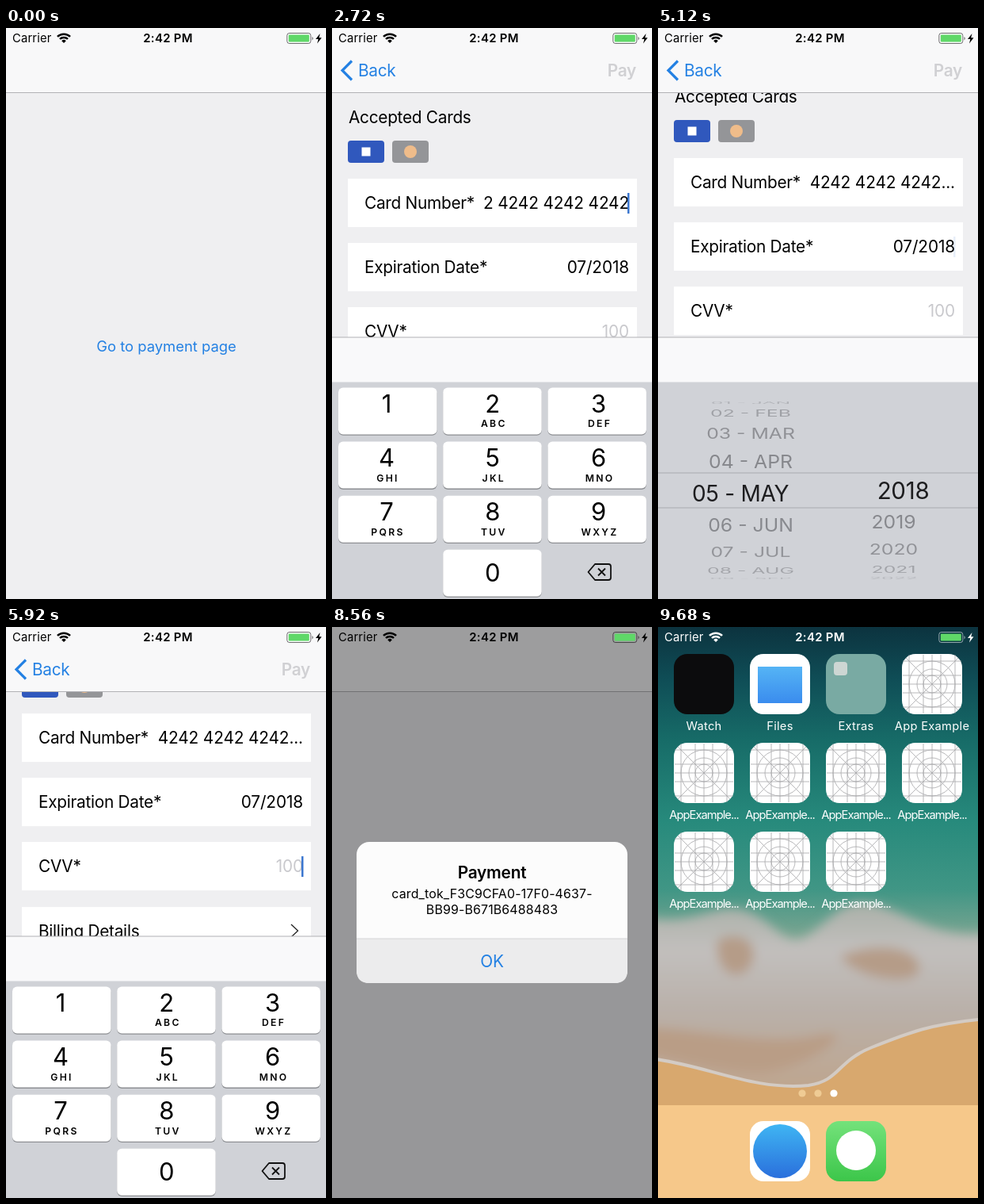
Animation of 404 by 720 pixels, one loop 9.76 s. Source, as an HTML page:

```html
<!DOCTYPE html>
<html lang="en">
<head>
<meta charset="utf-8">
<title>Card payment</title>
<style>
  html, body { margin: 0; width: 100%; height: 100%; overflow: hidden; background: #efeff1; }
  svg { display: block; font-family: Inter, "Liberation Sans", sans-serif; }
  text { white-space: pre; }
</style>
</head>
<body>
<script>
const W = 404, H = 720, LOOP = 9760, STEP = 80;
const BLUE = '#2481e3', PAGE = '#efeff1', BAR = '#f8f8f9', LINE = '#b2b2b6', KEYS = '#d0d2d7', HINT = '#c9c9cd';

// ---------- drawing helpers ----------
function add(parent, tag, attrs = {}, content) {
  const node = document.createElementNS('http://www.w3.org/2000/svg', tag);
  set(node, attrs);
  if (content !== undefined) node.textContent = content;
  return parent.appendChild(node);
}
function set(node, attrs) {
  for (const key in attrs) node.setAttribute(key, attrs[key]);
}
const group = (parent, attrs) => add(parent, 'g', attrs);
const rect = (parent, x, y, width, height, fill, attrs) =>
  add(parent, 'rect', { x, y, width, height, fill, ...attrs });
const path = (parent, d, attrs) => add(parent, 'path', { d, fill: 'none', ...attrs });
const circle = (parent, cx, cy, r, attrs) => add(parent, 'circle', { cx, cy, r, ...attrs });
// y is the middle of the capitals
const label = (parent, str, x, y, size, attrs) =>
  add(parent, 'text', { x, y: y + size * 0.364, 'font-size': size, ...attrs }, str);
const body = (parent, str, x, y, attrs) =>
  label(parent, str, x, y, 20.8, { 'letter-spacing': '-.013em', ...attrs });
const MID = { 'text-anchor': 'middle' }, END = { 'text-anchor': 'end' };

const svg = add(document.body, 'svg', { width: W, height: H, viewBox: `0 0 ${W} ${H}` });
const defs = add(svg, 'defs');

function gradient(id, stops, across) {
  const g = add(defs, 'linearGradient', { id, x1: 0, y1: 0, x2: across ? 1 : 0, y2: across ? 0 : 1 });
  for (const [offset, color, alpha = 1] of stops)
    add(g, 'stop', { offset, 'stop-color': color, 'stop-opacity': alpha });
  return `url(#${id})`;
}
function clip(id, x, y, w, h) {
  rect(add(defs, 'clipPath', { id }), x, y, w, h);
  return { 'clip-path': `url(#${id})` };
}

// ---------- launcher screen ----------
const launcher = group(svg);
rect(launcher, 0, 0, W, H, gradient('sea', [
  [0, '#0c333f'], [.09, '#0f4d56'], [.2, '#176c68'], [.34, '#278a7c'], [.46, '#409685'], [.55, '#80a692']]));
const soft = add(defs, 'filter', { id: 'soft', x: '-10%', y: '-10%', width: '120%', height: '120%' });
add(soft, 'feGaussianBlur', { stdDeviation: 7 });
const surf = group(launcher, { filter: 'url(#soft)' });
path(surf, 'M-30 362C40 385 70 345 110 358S160 412 195 385S240 335 290 355S360 395 434 385V620H-30Z',
  { fill: gradient('foam', [[0, '#aab0a8'], [.22, '#c2bfbd'], [.5, '#b9b0a9'], [1, '#c0a184']]) });
path(surf, 'M75 395C105 380 130 400 118 425S70 440 75 395ZM230 415C280 395 330 405 330 430S250 445 230 415Z', { fill: '#b59c88' });
path(surf, 'M-30 505C60 505 130 530 200 515S180 565 120 562S20 545 -30 535Z', { fill: '#b99d86' });
path(launcher, 'M-10 544C60 552 120 585 190 578C230 572 225 548 270 530S345 500 414 494V730H-10Z',
  { fill: '#d8a86e', stroke: '#d3cbc4', 'stroke-width': 4 });
rect(launcher, 0, 603, W, 117, '#f6c88a');
[182, 202, 222].forEach((x, i) => circle(launcher, x, 588, 4.6, { fill: i < 2 ? '#efcb94' : '#fff' }));

const gridIcon = add(defs, 'g', { id: 'grid' });
rect(gridIcon, 0, 0, 76, 76, '#fff', { rx: 17 });
const gridLines = group(gridIcon, { stroke: '#a6a6a9', fill: 'none', 'stroke-width': .8 });
for (const r of [11, 19, 29]) circle(gridLines, 38, 38, r);
for (const p of [9, 27, 38, 49, 67]) path(gridLines, `M${p} 1V75M1 ${p}H75`);
path(gridLines, 'M5 5L71 71M71 5L5 71');

const tile = (x, y, fill) => rect(launcher, x, y, 76, 76, fill, { rx: 17 });
const column = i => 20 + 96 * i;
const caption = (str, x, y, spacing) =>
  label(launcher, str, x + 38, y + 91, 14.7, { ...MID, fill: '#fff', 'letter-spacing': spacing });
tile(column(0), 34, '#0c0c0d');
tile(column(1), 34, '#fff');
rect(launcher, 126, 50, 56, 46, gradient('folder', [[0, '#55b4f5'], [1, '#3a8cee']]));
tile(column(2), 34, '#79aaa3');
rect(launcher, 222, 44, 17, 17, '#cdd6d3', { rx: 4 });
['Watch', 'Files', 'Extras', 'App Example'].forEach((name, i) => caption(name, column(i), 34, '.02em'));
for (let i = 0; i < 8; i++) {
  const x = column(i ? (i - 1) % 4 : 3), y = i ? 146 + 112 * Math.floor((i - 1) / 4) : 34;
  add(launcher, 'use', { href: '#grid', x, y });
  if (i) caption('AppExample...', x, y, '-.065em');
}
tile(column(1), 623, '#fff');
circle(launcher, 154, 661, 34, { fill: gradient('sky', [[0, '#3fb5f3'], [1, '#2a6fdc']]) });
tile(column(2), 623, gradient('leaf', [[0, '#74e27b'], [1, '#3cc64a']]));
circle(launcher, 250, 660, 25, { fill: '#fff' });

// ---------- app: first page ----------
const app = group(svg);
const home = group(app);
rect(home, 0, 0, W, H, PAGE);
const goButton = label(home, 'Go to payment page', 202.5, 401, 18.4, { ...MID, fill: BLUE });
const shade = rect(app, 0, 0, W, H, '#00182c');

// ---------- app: payment form ----------
const form = group(app);
rect(form, -12, 0, 12, H, gradient('edge', [[0, '#000', 0], [1, '#000', .2]], true));
rect(form, 0, 0, W, H, PAGE);
const content = group(form);
body(content, 'Accepted Cards', 21, 112);
rect(content, 20, 142, 46, 28, '#3058bd', { rx: 4 });
rect(content, 37.5, 150.5, 11, 11, '#fff');
const otherCard = group(content);
rect(otherCard, 76, 142, 46, 28, '#3c3d41', { rx: 4 });
circle(otherCard, 99, 156, 8, { fill: '#f08a25' });

function field(name, y) {
  rect(content, 20, y, 365, 61, '#fff');
  body(content, name, 41, y + 30.5);
  const holder = group(content, clip('value' + y, 190, y, 190, 61));
  const value = body(holder, '', 375, y + 30.5, { ...END, 'letter-spacing': '-.006em' });
  const cursor = rect(content, 373, y + 18, 2.5, 26, '#3b76cf');
  return (str, isHint, cursorAlpha) => {
    value.textContent = str;
    set(value, { fill: isHint ? HINT : '#000' });
    set(cursor, { opacity: cursorAlpha });
  };
}
const showNumber = field('Card Number*', 190);
const showExpiry = field('Expiration Date*', 271);
const showCode = field('CVV*', 352);
field('Billing Details', 434)('', false, 0);
path(content, 'M360 456L368.500 464L360 472', { stroke: '#222', 'stroke-width': 1.3 });

// ---------- app: input panel ----------
const panel = group(app);
rect(panel, 0, 390, W, 330, KEYS);
rect(panel, 0, 390, W, 56.5, '#f9f9fa');
rect(panel, 0, 389.5, W, 1, LINE);

const keypad = group(panel);
['', 'ABC', 'DEF', 'GHI', 'JKL', 'MNO', 'PQRS', 'TUV', 'WXYZ', null, ''].forEach((letters, i) => {
  if (letters === null) return;
  const col = i % 3, zero = i === 10;
  const x = 8 + 132.2 * col, y = 453.5 + 68.1 * Math.floor(i / 3), middle = 69 + 133.8 * col;
  rect(keypad, x, y + 1.3, 124.5, 59, '#8d8f93', { rx: 6 });
  rect(keypad, x, y, 124.5, 59, '#fff', { rx: 6 });
  label(keypad, zero ? '0' : i + 1, middle, y + (zero ? 28.5 : 20.5), 31, MID);
  label(keypad, letters, middle + 1.5, y + 45.5, 12.2, { ...MID, 'font-weight': 600, 'letter-spacing': 2.3 });
});
path(keypad, 'M332 676H349Q352 676 352 679V693Q352 696 349 696H332L323.500 686ZM336 681.500L345 690.500M345 681.500L336 690.500',
  { stroke: '#111', 'stroke-width': 1.8, 'stroke-linejoin': 'round' });

const picker = group(panel);
rect(picker, 0, 447, W, 273, KEYS);
for (const y of [561, 605]) rect(picker, 0, y - .5, W, 1, '#a9abb0');
const band = clip('band', 0, 561, W, 44);

function wheel(items, x, bigX, bigSize) {
  const far = group(picker), near = group(picker, band);
  const rows = items.map(str => ({
    small: label(far, str, 0, 0, 24.8, { ...MID, fill: '#6a6b70' }),
    big: label(near, str, 0, 0, bigSize, { ...MID, fill: '#1d1d1f', 'letter-spacing': '-.01em' })
  }));
  return position => rows.forEach(({ small, big }, i) => {
    const turn = i - position, angle = turn * 0.365;
    const hidden = Math.abs(turn) < .55 || Math.abs(angle) > 1.52;
    set(small, {
      transform: `translate(${x} ${583 + 112 * Math.sin(angle)}) scale(1 ${Math.max(.01, Math.cos(angle))})`,
      opacity: hidden ? 0 : .2 + .55 * Math.cos(angle)
    });
    set(big, { transform: `translate(${bigX} ${583 + 40 * turn})` });
  });
}
const months = 'JAN FEB MAR APR MAY JUN JUL AUG SEP OCT NOV DEC'.split(' ')
  .map((name, i) => `${String(i + 1).padStart(2, '0')} - ${name}`);
const turnMonths = wheel(months, 117, 104, 28);
wheel([2018, 2019, 2020, 2021, 2022, 2023], 297.5, 309.5, 29.5)(0);

// ---------- app: navigation bar and alert ----------
const nav = group(app);
rect(nav, 0, 0, W, 82, BAR);
rect(nav, 0, 81, W, 1, LINE);
const chevron = path(nav, 'M25 41.500L13 53.500L25 65.500', { stroke: BLUE, 'stroke-width': 3.2 });
const back = body(nav, 'Back', 33, 53.5, { fill: BLUE });
const pay = body(nav, 'Pay', 384, 53.5, { ...END, 'font-weight': 600 });

const dim = rect(app, 0, 0, W, H, '#000');
const alertBox = group(app);
rect(alertBox, 31, 271, 342, 178, '#fcfcfc', { rx: 16 });
path(alertBox, 'M31 393H373V433Q373 449 357 449H47Q31 449 31 433Z', { fill: '#ececed' });
rect(alertBox, 31, 392.5, 342, 1, '#d6d6d8');
label(alertBox, 'Payment', 202, 309.5, 20.8, { ...MID, 'font-weight': 600, 'letter-spacing': '-.01em' });
label(alertBox, 'card_tok_F3C9CFA0-17F0-4637-', 202, 336.5, 15.9, { ...MID, 'letter-spacing': '.01em' });
label(alertBox, 'BB99-B671B6488483', 202, 356.5, 15.9, { ...MID, 'letter-spacing': '.01em' });
body(alertBox, 'OK', 202, 421.5, { ...MID, fill: BLUE });

// ---------- status bar ----------
const status = group(svg);
label(status, 'Carrier', 8, 13, 14.8, { fill: 'currentColor', 'letter-spacing': '.01em' });
label(status, '2:42 PM', 204.5, 13, 14.9, { ...MID, fill: 'currentColor', 'font-weight': 600, 'letter-spacing': '.02em' });
const arc = r => `M${73 - r * .7} ${19 - r * .7}A${r} ${r} 0 0 1 ${73 + r * .7} ${19 - r * .7}`;
path(status, arc(11.5) + arc(7.2), { stroke: 'currentColor', 'stroke-width': 2.5 });
path(status, arc(4) + 'L73 19Z', { fill: 'currentColor' });
rect(status, 354.8, 6.5, 30, 13, 'none', { rx: 3, stroke: 'currentColor', 'stroke-opacity': .55 });
rect(status, 356.8, 8.5, 26, 9, '#5fd868', { rx: 1.2 });
path(status, 'M386.500 11Q389 13 386.500 15.500Z', { fill: 'currentColor', opacity: .6 });
path(status, 'M396.500 7L391 14H394.300L393 19.500L398.500 12.200H395.200Z', { fill: 'currentColor' });

// ---------- motion ----------
const ramp = (t, start, length) => Math.min(1, Math.max(0, (t - start) / length));
const glide = (t, start, length = 500, power = 4) => 1 - (1 - ramp(t, start, length)) ** power;
const during = (t, from, to) => +(t >= from && t < to);

function typedNumber(t) {
  if (t < 2160) return '4242';
  if (t >= 3200) return '4242 4242 4242...';
  const count = Math.min(16, 2 * (Math.floor((t - 2160) / STEP) + 1));
  return '4242424242424242'.slice(0, count).replace(/(.{4})(?=.)/g, '$1 ');
}
function typedCode(t) {
  return t < 6080 || t >= 6320 ? '100' : t < 6240 ? '1' : '10';
}
function blink(t) {
  if (t < 4160) return 1;
  return Math.min(1, Math.max(0, .5 + 1.2 * Math.cos(2 * Math.PI * (t - 4831) / 960)));
}

function render(t) {
  const push = glide(t, 228) - glide(t, 7432);
  set(home, { transform: `translate(${-121 * push} 0)` });
  set(goButton, { opacity: t < 80 ? 1 : .3 + .7 * ramp(t, 240, 320) });
  set(shade, { opacity: .11 * push });
  set(form, { transform: `translate(${W * (1 - push)} 0)`, visibility: push > 0 ? 'visible' : 'hidden' });
  set(content, { transform: `translate(0 ${-26 * glide(t, 3270) - 55 * glide(t, 5520)})` });
  set(otherCard, { opacity: 1 - .5 * ramp(t, 2080, 240) });

  showNumber(typedNumber(t), t < 2160, during(t, 1200, 3200));
  showExpiry('07/2018', false, during(t, 3200, 5440) * blink(t));
  showCode(typedCode(t), t < 6080, during(t, 5440, 6560));

  const raised = glide(t, 1577) - glide(t, 6620);
  set(panel, { transform: `translate(0 ${331 * (1 - raised)})` });
  set(picker, { opacity: ramp(t, 3160, 320) - ramp(t, 5400, 320) });
  turnMonths(4 * glide(t, 4120, 1160, 1.86));

  set(chevron, { opacity: push });
  set(back, { opacity: push, transform: `translate(${30 * (1 - push)} 0)` });
  set(pay, { opacity: push * (t >= 7360 ? .2 : 1), fill: t < 6320 ? '#d0d0d3' : BLUE });

  const shown = glide(t, 8220, 180), alertAlpha = shown - ramp(t, 8600, 440);
  set(dim, { opacity: .37 * alertAlpha });
  set(alertBox, {
    opacity: alertAlpha,
    transform: `translate(202 360) scale(${1.15 - .15 * shown}) translate(-202 -360)`
  });

  const close = ramp(t, 9460, 220);
  set(app, {
    transform: `translate(${308 * close} ${34 * close}) scale(${1 - .812 * close} ${1 - .894 * close})`,
    opacity: 1 - close * close
  });
  set(status, { color: close > 0 ? '#fff' : '#000' });
}

const began = performance.now();
function frame() {
  // small lead keeps a step from landing one display refresh late
  const t = (performance.now() - began + 8) % LOOP;
  render(Math.floor(t / STEP) * STEP);
  requestAnimationFrame(frame);
}
frame();
</script>
</body>
</html>
```
